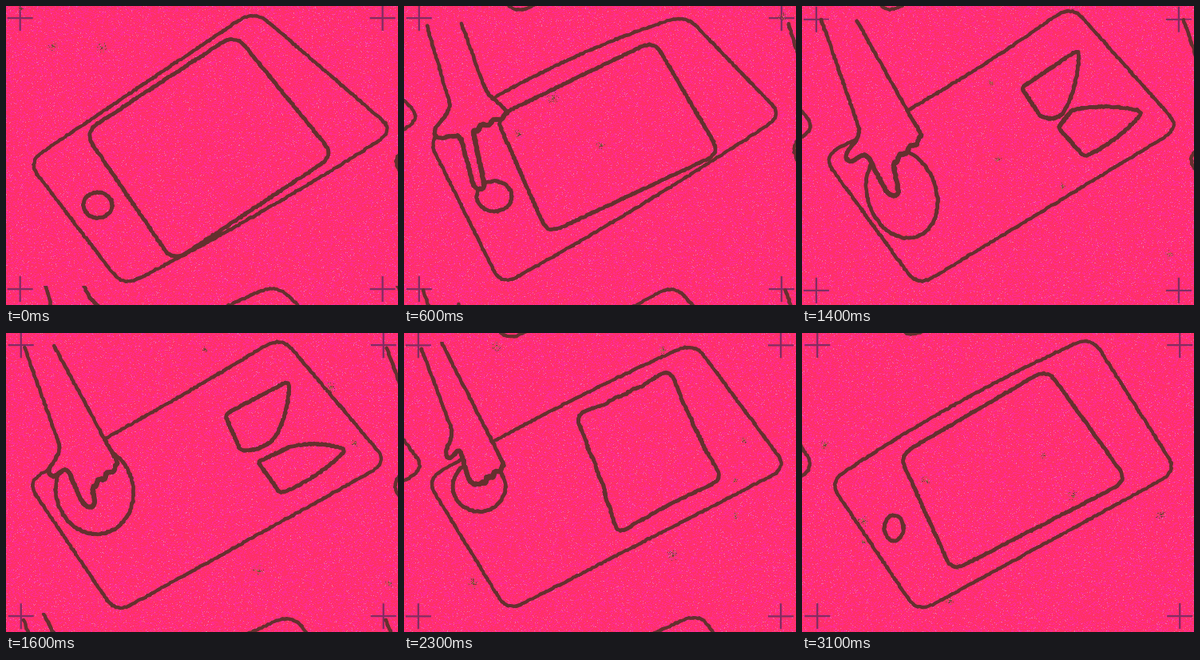
An HTML page with a canvas that plays this animation: 491x374 px, repeating every 3200 ms.

```html
<!DOCTYPE html>
<html lang="en">
<head>
<meta charset="utf-8">
<title>Printed phone loop</title>
<style>
html, body { margin: 0; width: 100%; height: 100%; overflow: hidden; background: #ff306c; }
canvas { display: block; width: 491px; height: 374px; }
</style>
</head>
<body>
<canvas id="stage" width="491" height="374"></canvas>
<script>
const W = 491, H = 374, STEP = 100, STEPS = 32;
const CELL_W = 454, CELL_H = 339, GRID = 4;
const INK = '#65312f', CROSS = '#822c62';
const ctx = document.getElementById('stage').getContext('2d');

// Key poses by step. Quads list their left, top, right and bottom corners.
const body = { // corners, then the bulge of the upper and lower edge
  0: [27, 195, 311, 5, 487, 156, 147, 351, 0, 5],
  6: [30, 166, 352, 11, 474, 137, 122, 350, 13, 4],
  10: [24, 190, 338, 9, 470, 155, 104, 350, 2, 0],
  14: [26, 188, 337, -1, 474, 152, 145, 351, -7, 0],
  19: [26, 182, 356, 12, 485, 177, 127, 350, 4, 0],
  27: [30, 184, 370, 11, 475, 160, 132, 347, 6, 0],
  31: [34, 186, 362, 4, 470, 173, 145, 350, 8, 0]
};
const screen = { // corners, then how far it crumples
  0: [98, 158, 287, 35, 411, 187, 209, 320, 0],
  6: [115, 139, 313, 43, 396, 184, 180, 285, 0],
  10: [179, 130, 330, 53, 405, 172, 251, 251, 1],
  27: [225, 95, 334, 43, 397, 187, 272, 253, 0],
  31: [122, 153, 307, 45, 408, 185, 188, 298, 0]
};
const leftPiece = {
  14: [275, 102, 347, 54, 328, 134, 298, 137],
  19: [272, 102, 366, 68, 350, 128, 288, 162]
};
const rightPiece = {
  14: [321, 152, 338, 130, 428, 132, 354, 189],
  19: [307, 175, 385, 160, 425, 167, 329, 219]
};
const button = { // centre, radii, tilt
  0: [115, 249, 18, 16, 0],
  6: [113, 238, 22, 19, 0],
  10: [119, 249, 22, 17, 0],
  14: [125, 235, 43, 57, -0.35],
  19: [90, 140, 57, 52, 0],
  27: [98, 244, 9, 11, 0],
  31: [115, 244, 12, 16, 0]
};
const hand = { // left arm, wrist, thumb, finger root, tip, root, palm, wrist, right arm
  6: [29, 25, 59, 128, 37, 160, 70, 160, 95, 229, 86, 155, 132, 134, 103, 108, 72, 22],
  10: [24, 17, 76, 160, 64, 191, 91, 189, 118, 249, 114, 211, 153, 176, 108, 140, 68, 34],
  14: [24, 17, 74, 160, 54, 190, 80, 183, 115, 237, 114, 195, 151, 163, 137, 140, 69, 19],
  19: [22, 20, 62, 126, 52, 153, 69, 142, 90, 189, 98, 186, 126, 166, 105, 125, 47, 12]
};

const clamp01 = v => Math.max(0, Math.min(1, v));
const mix = (a, b, u) => a + (b - a) * u;
const blend = (p, q, u) => p.map((v, i) => mix(v, q[i], u));
const distance = (p, q) => Math.hypot(q[0] - p[0], q[1] - p[1]) || 1;

function randomFrom(seed) {
  return () => {
    seed = (seed + 0x6D2B79F5) | 0;
    let n = Math.imul(seed ^ (seed >>> 15), 1 | seed);
    n = (n + Math.imul(n ^ (n >>> 7), 61 | n)) ^ n;
    return ((n ^ (n >>> 14)) >>> 0) / 4294967296;
  };
}

function sample(track, step) {
  const keys = Object.keys(track).map(Number);
  const a = keys.findLast(k => k <= step) ?? keys[0];
  const b = keys.find(k => k > step) ?? a;
  return a >= b ? track[a] : blend(track[a], track[b], clamp01((step - a) / (b - a)));
}

const pairs = list => Array.from({ length: list.length / 2 }, (_, i) => [list[2 * i], list[2 * i + 1]]);

// Replaces every vertex by a short curve that cuts the corner.
function rounded(vertices, radius, closed) {
  const n = vertices.length, out = [];
  vertices.forEach((v, i) => {
    if (!closed && (i === 0 || i === n - 1)) return out.push(v);
    const ends = [vertices[(i + n - 1) % n], vertices[(i + 1) % n]].map(p => {
      const d = distance(v, p);
      return blend(v, p, Math.min(radius, d / 2) / d);
    });
    for (let t = 0; t <= 1; t += 0.2) {
      out.push(blend(blend(ends[0], v, t), blend(v, ends[1], t), t));
    }
  });
  if (closed) out.push(out[0]);
  return out;
}

// A four-cornered outline whose edges bulge outward by the given amounts.
function quad(corners, bulges, ripple, radius) {
  const vertices = [];
  corners.forEach((p, i) => {
    const q = corners[(i + 1) % 4], d = distance(p, q);
    vertices.push(p);
    for (let k = 0; k <= 6; k++) {
      const t = 0.2 + k * 0.1;
      const out = bulges[i] * 4 * t * (1 - t) + ripple * Math.cos(Math.PI * k + i) * (1 + k % 3 / 2);
      const [x, y] = blend(p, q, t);
      vertices.push([x + (q[1] - p[1]) / d * out, y - (q[0] - p[0]) / d * out]);
    }
  });
  return rounded(vertices, radius, true);
}

function ellipse([cx, cy, rx, ry, tilt]) {
  return Array.from({ length: 33 }, (_, i) => {
    const a = i / 16 * Math.PI, x = rx * Math.cos(a), y = ry * Math.sin(a);
    return [cx + x * Math.cos(tilt) - y * Math.sin(tilt), cy + x * Math.sin(tilt) + y * Math.cos(tilt)];
  });
}

function handOutline(list, lift) {
  const joints = pairs(list).map(([x, y]) => [x, y - lift]);
  const [armL, wristL, thumb, root, tip, knuckle, palm, wristR, armR] = joints;
  const near = ([x, y], dx, dy) => [x + dx, y + dy];
  const bumps = Array.from({ length: 6 }, (_, i) => {
    const side = i % 2 ? -2.5 : 4;
    return near(blend(knuckle, palm, (i + 0.5) / 6), side * 0.6, side);
  });
  return rounded([armL, wristL, near(thumb, -1, -3), near(thumb, 6, 7), root,
    near(tip, -7, 0), near(tip, 7, 0), knuckle, ...bumps, palm, wristR, armR], 11, false);
}

function inkLine(path, width, random, swell = 0) {
  ctx.strokeStyle = INK;
  ctx.lineCap = 'round';
  let previous = path[0];
  path.forEach((p, i) => {
    const start = path[Math.max(0, i - 1)];
    const n = Math.ceil(distance(start, p) / 3);
    for (let k = 1; k <= n; k++) {
      const next = blend(start, p, k / n).map(v => v + (random() - 0.5) * 1.2);
      ctx.lineWidth = width + random() - 0.5 + swell * Math.sin(Math.PI * i / path.length);
      ctx.beginPath();
      ctx.moveTo(...previous);
      ctx.lineTo(...next);
      ctx.stroke();
      previous = next;
    }
  });
}

function makePaper() {
  const tile = document.createElement('canvas');
  tile.width = W;
  tile.height = H;
  const g = tile.getContext('2d'), random = randomFrom(7);
  g.fillStyle = '#ff3068';
  g.fillRect(0, 0, W, H);
  const flecks = (count, color, length) => {
    g.fillStyle = color;
    for (let i = 0; i < count; i++) {
      g.fillRect(Math.floor(random() * W), Math.floor(random() * H), 1 + Math.floor(random() * length), 1);
    }
  };
  flecks(46000, '#ff2c94', 2);
  flecks(4200, '#f070a4', 1);
  return ctx.createPattern(tile, 'repeat');
}
const paper = makePaper();

function coverWithPaper(path) {
  ctx.fillStyle = paper;
  ctx.beginPath();
  path.forEach(p => ctx.lineTo(...p));
  ctx.fill();
}

function drawCell(step, random) {
  const frame = sample(body, step);
  inkLine(quad(pairs(frame.slice(0, 8)), [frame[8], 0, frame[9], 0], 0, 24), 4.1, random);

  if (step < 12 || step >= 23) {
    const s = sample(screen, step), crumple = s[8];
    inkLine(quad(pairs(s.slice(0, 8)), Array(4).fill(-14 * crumple), 3.5 * crumple, 20), 4.6, random);
  } else {
    for (const piece of [leftPiece, rightPiece]) {
      inkLine(quad(pairs(sample(piece, step)), [0, 5, 5, 0], 0, 12), 4.6, random);
    }
  }

  const disc = ellipse(sample(button, step));
  coverWithPaper(disc);
  inkLine(disc, 4.6, random);

  // The hand comes down from above, and leaves the same way.
  const away = step < 6 ? 1 - step / 6 : clamp01((step - 23) / 4);
  if (away < 1) {
    ctx.save();
    ctx.beginPath();
    ctx.rect(0, 11, W, H);
    ctx.clip();
    const outline = handOutline(sample(hand, step), 250 * away);
    coverWithPaper(outline);
    inkLine(outline, 4.3, random, 1.8);
    ctx.restore();
  }
}

function drawCrosses(random) {
  const x = 17.5 + random() * 2.5, y = 15 + random() * 2;
  ctx.strokeStyle = CROSS;
  ctx.lineWidth = 2.3;
  for (const cx of [x, x + CELL_W]) for (const cy of [y, y + CELL_H]) {
    ctx.beginPath();
    ctx.moveTo(cx - 16, cy);
    ctx.lineTo(cx + 16, cy);
    ctx.moveTo(cx, cy - 16);
    ctx.lineTo(cx, cy + 16);
    ctx.stroke();
  }
}

function drawSmudges(count, random) {
  for (let n = 0; n < count; n++) {
    const x = random() * W, y = random() * H, r = 3 + random() * 5;
    for (let i = 0; i < r * 5; i++) {
      const a = random() * Math.PI * 2, d = random() * r;
      ctx.fillStyle = random() < 0.5 ? '#74403a' : '#b5604f';
      ctx.fillRect(Math.round(x + Math.cos(a) * d), Math.round(y + Math.sin(a) * d), 1 + (d < r / 3), 1);
    }
  }
}

// Each step is one cell of a printed 4 by 4 sheet, with its neighbours at the edges.
function draw(step) {
  const random = randomFrom(step * 997 + 13);
  paper.setTransform(new DOMMatrix().translate(random() * W | 0, random() * H | 0));
  ctx.fillStyle = paper;
  ctx.fillRect(0, 0, W, H);
  drawCrosses(random);
  drawSmudges(3 + step / 6, random);

  const column = step % GRID, row = Math.floor(step / GRID) % GRID;
  for (let dy = -1; dy <= 1; dy++) for (let dx = -1; dx <= 1; dx++) {
    const inSheet = [column + dx, row + dy].every(v => v >= 0 && v < GRID);
    if (!inSheet) continue;
    ctx.save();
    ctx.translate(dx * CELL_W, dy * CELL_H);
    drawCell(step + dx + dy * GRID, random);
    ctx.restore();
  }
}

let shown = -1;
function tick(now) {
  const step = Math.floor(now / STEP) % STEPS;
  if (step !== shown) draw(shown = step);
  requestAnimationFrame(tick);
}
draw(0);
requestAnimationFrame(tick);
</script>
</body>
</html>
```
